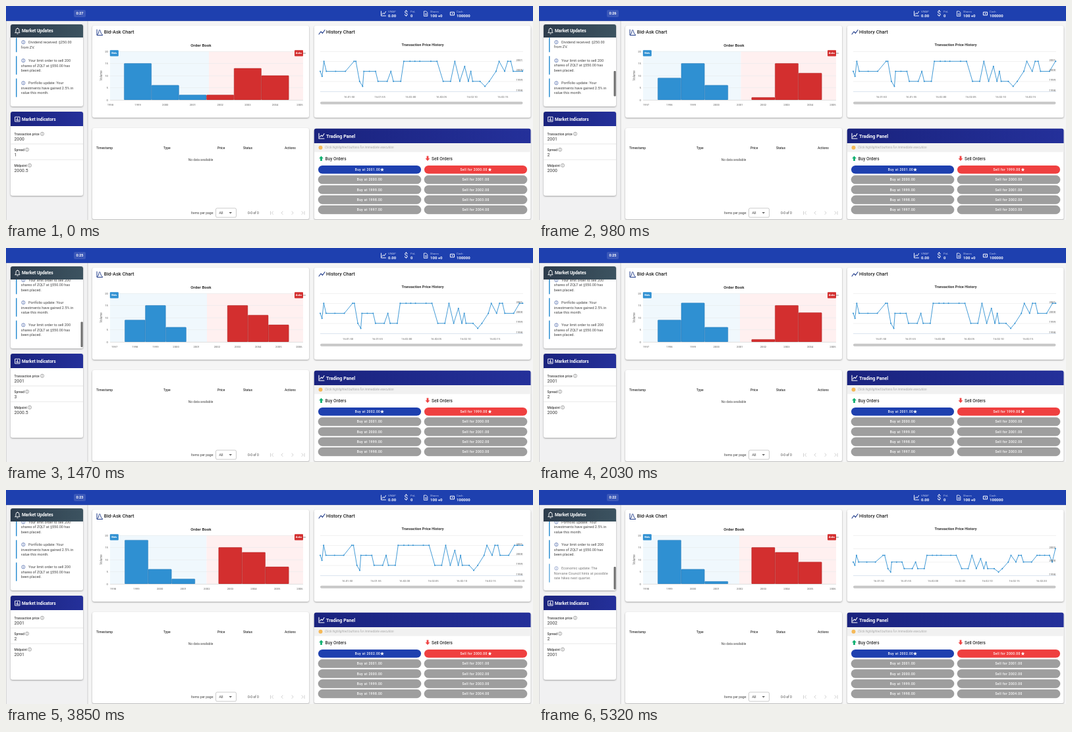
These frames come from a looping animation (800 by 326 pixels, 5.39 s). An HTML page:

```html
<!DOCTYPE html>
<html lang="en">
<head>
<meta charset="utf-8">
<title>Trading dashboard</title>
<style>
  html, body { margin: 0; width: 100%; height: 100%; overflow: hidden; background: #f5f5f5; }
  svg { display: block; width: 800px; height: 326px; font-family: Roboto, "Open Sans", sans-serif; }
  .card { fill: #fff; filter: drop-shadow(0 1px 1px #0005); }
  .line { fill: none; stroke-linecap: round; stroke-linejoin: round; }
  .b { font-weight: 700; }
  .m { font-weight: 500; }
  .mid { text-anchor: middle; }
  .end { text-anchor: end; }
  .button { letter-spacing: .4px; font-weight: 500; }
</style>
</head>
<body>
<svg viewBox="0 0 800 326">
  <defs>
    <linearGradient id="slate"><stop stop-color="#2d3c4c"/><stop offset="1" stop-color="#3c5360"/></linearGradient>
    <linearGradient id="indigo"><stop stop-color="#1a237e"/><stop offset="1" stop-color="#24309a"/></linearGradient>
    <clipPath id="feedClip"><path d="M7 48H117V152.500H7Z"/></clipPath>
    <clipPath id="bookClip"><path d="M158 60H451V143.500H158Z"/></clipPath>
    <clipPath id="historyClip"><path d="M475 60H785.500V135H475Z"/></clipPath>
  </defs>
  <g id="fixed"></g>
  <g id="live"></g>
</svg>
<script>
const LOOP = 5390;
const BLUE = '#2f90d2', RED = '#d32f2f', NAVY = '#1e40af';

// Each state eases in from the one before it. vol holds volumes for prices 1998 to 2005.
const states = [
  { at: -1000, dur: 1, last: 2000, spread: 1, mid: 2000.5, buy: 2001, sell: 2000,
    hi: 2005, step: 41.7, split: 308, span: 32.9, top: 2002, vol: [0, 15, 6, 2, 2, 13, 10, 0] },
  { at: 70, dur: 420, last: 2001, spread: 2, mid: 2000, buy: 2001, sell: 1999,
    hi: 2005, step: 35.6, split: 306.5, span: 33.9, top: 2002, vol: [9, 15, 6, 0, 1, 15, 11, 0] },
  { at: 1010, dur: 460, last: 2001, spread: 3, mid: 2000.5, buy: 2002, sell: 1999,
    hi: 2006, step: 31.15, split: 305, span: 34.4, top: 2002, vol: [9, 15, 6, 0, 0, 15, 11, 7] },
  { at: 1540, dur: 420, last: 2001, spread: 2, mid: 2000, buy: 2001, sell: 1999,
    hi: 2005, step: 35.6, split: 305, span: 34.4, top: 2002, vol: [9, 16, 6, 0, 1, 15, 12, 0] },
  { at: 2310, dur: 490, last: 2001, spread: 2, mid: 2001, buy: 2002, sell: 2000,
    hi: 2006, step: 35.6, split: 304.5, span: 35.3, top: 2002, vol: [0, 18, 6, 2, 0, 15, 13, 7] },
  { at: 4060, dur: 420, last: 2002, spread: 2, mid: 2001, buy: 2002, sell: 2000,
    hi: 2006, step: 35.6, split: 304, span: 37.3, top: 2004, vol: [0, 18, 6, 1, 0, 14, 13, 8] },
  { at: 5110, dur: 210, last: 2002, spread: 2, mid: 2001, buy: 2002, sell: 2000,
    hi: 2006, step: 35.6, split: 304, span: 37.3, top: 2004, vol: [0, 18, 6, 1, 0, 15, 13, 9] }
];
const ticks = [420, 1400, 2380, 3430, 4410];

// Trades as [seconds, price above 1998]
const trades = [
  [0, 2], [.3, 1.5], [.6, 3], [1, 2], [2.5, 2], [4.1, 2], [5.5, 3], [5.8, 3], [6.4, 1], [6.9, .5],
  [7.1, 2], [8, 2], [9, 2], [9.4, 1], [10.9, 1], [11.5, 2], [11.9, 1], [13.1, 1],
  [13.6, 3], [14.6, 3], [15.4, 3], [16.2, 3], [18, 3], [19, 3], [20, 1], [21.2, 1], [21.9, 3],
  [22.7, 1], [23.5, 2.5], [24.1, 1], [24.5, 2], [24.8, 1], [26, 1], [26.8, .5], [27.5, 1],
  [28.6, 2], [29.1, 3], [30, 2], [30.5, 3], [31, 3], [31.4, 2], [32.9, 2], [33.9, 3], [34.4, 3],
  [35.3, 3], [36.2, 3], [36.7, 2], [37.3, 4]
];

const limitOrder = ['Your limit order to sell 200', 'shares of ZQLT at $550.00 has', 'been placed.'];
const messages = [
  ['Dividend received: $250.00', 'from ZV.'],
  limitOrder,
  ['Portfolio update: Your', 'investments have gained 2.5% in', 'value this month.'],
  limitOrder,
  ['Economic update: The', 'Norvane Council hints at possible', 'rate hikes next quarter.']
];

const mix = (a, b, k) => a + (b - a) * k;
const ramp = (t, at, dur) => Math.min(1, Math.max(0, (t - at) / dur));
const ease = k => (1 - Math.cos(Math.PI * k)) / 2;
const range = n => [...Array(n).keys()];

const text = (x, y, size, str, fill = '#333', cls = '') =>
  `<text x="${x}" y="${y}" font-size="${size}" fill="${fill}" class="${cls}">${str}</text>`;
const rect = (x, y, w, h, fill, r = 0, more = '') =>
  `<rect x="${x}" y="${y}" width="${w}" height="${h}" rx="${r}" fill="${fill}" ${more}/>`;
const line = (d, stroke, w = 1) => `<path class="line" d="${d}" stroke="${stroke}" stroke-width="${w}"/>`;
const shape = (d, fill) => `<path d="${d}" fill="${fill}"/>`;
const card = (x, y, w, h) => rect(x, y, w, h, '#fff', 3, 'class="card"');
const header = (x, y, w, h, fill) => shape(`M${x} ${y + h}v${3 - h}q0-3 3-3h${w - 6}q3 0 3 3v${h - 3}z`, fill);
const info = (x, y, c) => `<circle cx="${x}" cy="${y}" r="2.6" fill="none" stroke="${c}" stroke-width=".6"/>` +
  line(`M${x} ${y - .3}v1.500M${x} ${y - 1.5}v.1`, c, .6);
const chartIcon = (x, y, size, c) =>
  `<g transform="translate(${x} ${y}) scale(${size / 8})">${line('M0 0v8h8M1.500 5.500l2-2.500 2 1.500 2.500-4', c, 1.1)}</g>`;

function drawFixed() {
  const stat = (x, label, value) => text(x, 9.5, 4.2, label, '#b9c4ea') + text(x, 16.8, 6, value, '#fff', 'b');
  const topBar = rect(0, 0, 800, 22.8, NAVY, 0, 'style="filter:drop-shadow(0 .5px .6px #0006)"') +
    rect(103, 6, 18, 11, '#3b58b9', 2) +
    chartIcon(569.5, 8, 7, '#fff') + text(607.3, 15.3, 10, '$', '#fff', 'mid') +
    line('M634.800 8h3l2 2v5.500h-5zM636.200 11.700h2.200M636.200 13.500h2.200', '#fff', .8) +
    line('M674.800 9.300h5.700v4.700h-5.700z', '#fff', 1) + '<circle cx="677.6" cy="11.6" r=".9" fill="#fff"/>' +
    stat(580, 'VWAP', '0.00') + stat(614, 'PnL', '0') + stat(644, 'Shares', '100 +0') + stat(684, 'Cash', '100000');

  const side = rect(0, 0, 1, 326, '#d6d6d6') + rect(1, 22.5, 123, 303.5, '#f1f1f2') + rect(123.5, 22.5, 1, 303.5, '#cfcfcf') +
    card(7, 28, 110, 125) + header(7, 28, 110, 20, 'url(#slate)') +
    line('M14 40.700h7l-1-1.500v-2.500a2.500 2.500 0 0 0-5 0v2.500zM17 42.400h1M17.500 34.200v-.5', '#fff', .9) +
    text(24, 40.4, 6.7, 'Market Updates', '#fff', 'b') +
    card(7, 161, 110, 128) + header(7, 161, 110, 22, 'url(#indigo)') +
    line('M14 169h7v7h-7zM16 174.500v-2M17.500 174.500v-4M19 174.500v-1', '#fff', .9) +
    text(24, 174.6, 6.5, 'Market Indicators', '#fff', 'b') +
    [['Transaction price', 55], ['Spread', 32], ['Midpoint', 36]].map(([name, x], i) =>
      text(12.5, 196.8 + 24 * i, 4.9, name, '#444', 'm') + info(x, 194.8 + 24 * i, '#777')).join('') +
    rect(7, 209.7, 110, .7, '#ddd') + rect(7, 233.7, 110, .7, '#ddd');

  const book = card(131, 30, 329, 140) +
    line('M138 36v8.500h8.500M138.500 43.500c3-.5 2-7 3.700-7s1 6.500 4 7', '#1e3a8a', 1) +
    text(148.8, 42, 7.4, 'Bid-Ask Chart', '#222', 'm') + text(296, 61.6, 6.2, 'Order Book', '#333', 'b mid') +
    range(5).map(i => text(155, 144.5 - 18.5 * i, 4.3, 5 * i, '#666', 'end')).join('') +
    `<g transform="rotate(-90 145.5 106)">${text(145.5, 106, 4.6, 'Volume', '#666', 'mid')}</g>`;

  const history = card(467.8, 30, 328.7, 140) +
    line('M475 43l3-4 2.500 2.500 3.500-5', '#1e3a8a', 1.1) +
    text(486, 42, 7.4, 'History Chart', '#222', 'm') +
    text(632.5, 61, 5.6, 'Transaction Price History', '#333', 'b mid') +
    rect(477, 145.8, 307.5, 4, '#c8c8c8', 2);

  const columns = { Timestamp: 137, Type: 239, Price: 321, Status: 360, Actions: 423 };
  const table = card(131, 186, 329, 139) +
    Object.entries(columns).map(([name, x]) => text(x, 217.6, 4.9, name, '#333', 'm')).join('') +
    text(295.5, 236, 4.9, 'No data available', '#444', 'mid') + text(281, 317, 5, 'Items per page:', '#444') +
    rect(318.5, 308, 31, 14, '#fff', 2, 'stroke="#aaa" stroke-width=".6"') + text(323.5, 317, 5.2, 'All', '#333') +
    shape('M338.500 314h4.500l-2.250 2.400z', '#666') + text(367, 317, 5, '0-0 of 0', '#444') +
    line('M401.500 313v4.500M405.500 313l-2 2.200 2 2.200M420 313l-2 2.200 2 2.200M434 313l2 2.200-2 2.200M449 313l2 2.200-2 2.200M453 313v4.500', '#c4c4c4', .8);

  const panel = card(467.8, 186.7, 328.7, 138.3) + header(467.8, 186.7, 328.7, 22.3, 'url(#indigo)') +
    chartIcon(475, 194, 8, '#fff') + text(486, 200.5, 7.1, 'Trading Panel', '#fff', 'b') +
    rect(467.8, 209, 328.7, 13.5, '#f1f1f1') + '<circle cx="477.5" cy="215.8" r="3" fill="#f5b958"/>' +
    `<g font-style="italic">${text(484, 217.4, 4.9, 'Click highlighted buttons for immediate execution', '#aaa')}</g>` +
    shape('M478.500 228.500l3.400 3.800h-2v3.700h-2.800v-3.700h-2z', '#10b070') + text(484.5, 234.5, 6.5, 'Buy Orders', '#333', 'm') +
    shape('M640 236l3.400-3.800h-2v-3.700h-2.800v3.700h-2z', '#ef4444') + text(646, 234.5, 6.5, 'Sell Orders', '#333', 'm');

  return side + topBar + book + history + table + panel;
}

function drawFeed(t) {
  const first = ease(ramp(t, 980, 420)), second = ease(ramp(t, 5110, 210));
  const appear = [1, 1, 1, first, .7 * second];
  let y = 48.3 - 34.2 * (first + second), out = '';
  messages.forEach((rows, i) => {
    const height = rows.length > 2 ? 28.2 : 22, top = y + (i === 4 ? 2 : 0);
    out += `<g opacity="${appear[i]}">` + rect(15, top, 1.5, height, BLUE) + info(26.3, top + 6.8, '#2a4a9a') +
      rows.map((row, n) => text(n ? 22.8 : 34, top + 8.6 + 7.6 * n, 5.5, row, '#444')).join('') + '</g>';
    y += height + 6;
  });
  if (t >= 980) {
    const late = t >= 5110;
    const alpha = late ? 1 : 1 - ramp(t, 1540, 350);
    out += rect(113.5, late ? mix(108, 117, second) : mix(99, 112.5, first), 3.2, late ? 34.5 : 38.5, '#707070', 1, `opacity="${alpha}"`);
  }
  return `<g clip-path="url(#feedClip)">${out}</g>`;
}

function drawBook({ hi, step, split, vol }) {
  const px = price => 429.4 + step * (price - hi + .5);
  const bars = vol.map((v, i) => v < .02 ? '' :
    rect(px(1998 + i) - step / 2 + .2, 143 - 3.7 * v, step - .4, 3.7 * v, i < 4 ? BLUE : RED, .8,
      `stroke="${i < 4 ? '#1f6fae' : '#a32222'}" stroke-width=".4"`)).join('');
  const labels = range(10).map(i => 1997 + i).filter(p => px(p) > 157 && px(p) < 452)
    .map(p => text(Math.min(446, px(p)), 152, 4.2, p, '#666', 'mid')).join('');
  const grid = range(4).map(i => rect(158, 69 + 18.5 * i, 293, .5, '#e3e6e9')).join('');
  return rect(158, 69, split - 158, 74, '#f0f8fd') + rect(split, 69, 451 - split, 74, '#fff0f0') + grid +
    `<g clip-path="url(#bookClip)">${bars}</g>` + rect(158, 143, 293, .6, '#ccc') + labels +
    rect(157.8, 67.2, 13, 9.3, BLUE, 1) + text(164.3, 73.4, 4.2, 'Bids', '#fff', 'b mid') +
    rect(438, 67.2, 13, 9.3, RED, 1) + text(444.5, 73.4, 4.2, 'Asks', '#fff', 'b mid') +
    line('M451.500 72h3', '#555', .7);
}

function drawHistory({ span, top }) {
  const unit = 61 / (top - 1998);
  const px = s => 477 + 307 * s / span, py = v => 130 - unit * v;
  const points = trades.map(([s, v]) => [px(s), py(v)]).filter(([x]) => x < 830);
  const gap = top > 2003 ? 2 : 1;
  const levels = range(5).map(i => i * gap).filter(v => v <= top - 1998);
  return levels.map(v => rect(477, py(v), 308, .6, v ? '#e8e8e8' : '#c3d2e4')).join('') +
    '<g clip-path="url(#historyClip)">' + line('M' + points.join('L'), BLUE, .9) +
    points.map(([x, y]) => `<circle cx="${x}" cy="${y}" r="1" fill="${BLUE}"/>`).join('') + '</g>' +
    levels.filter(v => v < top - 1998).map(v => text(784, py(v) - .5, 4.2, 1998 + v, '#555', 'end')).join('') +
    range(7).filter(i => 4.72 + 5 * i <= span).map(i => {
      const sec = 50 + 5 * i;
      const label = `16:0${sec < 60 ? 1 : 2}:${String(sec % 60).padStart(2, '0')}`;
      return text(px(4.72 + 5 * i), 140.3, 4.2, label, '#666', 'mid');
    }).join('');
}

function drawOrders({ buy, sell }) {
  const button = (x, y, label, fill, best) =>
    rect(x, y, 156, 12.6, fill, 6.3, best ? '' : 'stroke="#858585" stroke-width=".5"') +
    text(x + (best ? 75 : 78), y + 8.1, 4.9, label, '#fff', 'mid button') +
    (best ? `<g transform="translate(${x + 79.5 + 1.25 * label.length} ${y + 6.2})">` +
      shape('M0-2.700l.8 1.800 2 .2-1.500 1.300.4 2L0 1.600l-1.700 1 .4-2-1.500-1.300 2-.2z', '#fff') + '</g>' : '');
  return range(5).map(i => {
    const y = 242.9 + 15.3 * i;
    return button(474, y, `Buy at ${buy - i}.00`, i ? '#9e9e9e' : NAVY, !i) +
      button(635, y, `Sell for ${sell + i}.00`, i ? '#9e9e9e' : '#ef4040', !i);
  }).join('');
}

function stateAt(t) {
  const i = states.findLastIndex(s => t > s.at), next = states[i], prev = states[Math.max(0, i - 1)];
  const k = ease(ramp(t, next.at, next.dur));
  const now = { ...next, vol: next.vol.map((v, n) => mix(prev.vol[n], v, k)) };
  for (const key of ['hi', 'step', 'split', 'span', 'top']) now[key] = mix(prev[key], next[key], k);
  return now;
}

function draw(t) {
  const s = stateAt(t);
  const seconds = 27 - ticks.filter(at => t >= at).length;
  live.innerHTML = text(112, 13.4, 5.4, '0:' + seconds, '#fff', 'b mid') + drawFeed(t) +
    [s.last, s.spread, s.mid].map((v, i) => text(12.5, 205.4 + 24 * i, 6.8, v, '#666', 'm')).join('') +
    drawBook(s) + drawHistory(s) + drawOrders(s);
}

const live = document.getElementById('live');
document.getElementById('fixed').innerHTML = drawFixed();
const start = performance.now();
function frame() {
  draw((performance.now() - start) % LOOP);
  requestAnimationFrame(frame);
}
frame();
</script>
</body>
</html>
```
